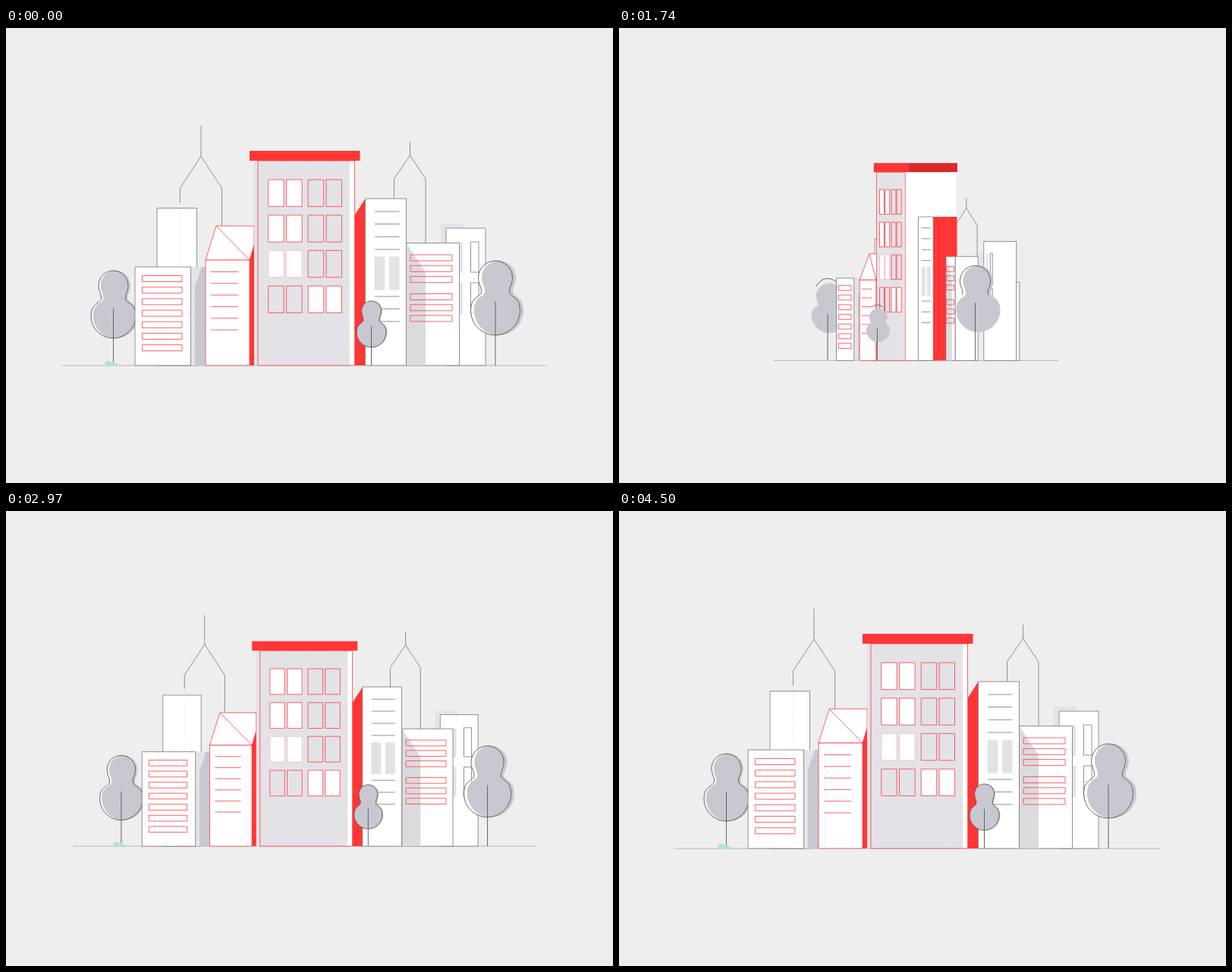
An HTML page for the animation above (4530 ms loop, 800 px wide and 600 px high).

```html
<!DOCTYPE html>
<html lang="en">
<head>
<meta charset="utf-8">
<title>City</title>
<style>
html,body{margin:0;width:100%;height:100%;overflow:hidden;background:#eee}
svg{display:block;width:100vw;height:100vh}
svg *{vector-effect:non-scaling-stroke}
.n{fill:none}.w{fill:#fff}.pale{fill:#e3e3e8}.dark{fill:url(#diag)}.bars{fill:url(#bars)}
.red{fill:#ff3636}.deep{fill:#d92b2d}.shade{fill:#dbdbde}.green{fill:#a9e8cc}
.g{stroke:#77777b;stroke-width:.8}.r{stroke:#ff3c42;stroke-width:.8}.p{stroke:#f3b9c4;stroke-width:.8}
.d{stroke:#ddd;stroke-width:.7;stroke-dasharray:2 2}
.t{stroke:#55555c;stroke-width:.9}
</style>
</head>
<body>
<svg id="stage" viewBox="0 0 800 600">
<defs>
<pattern id="bars" width="3" height="6" patternUnits="userSpaceOnUse"><path fill="#e5e5e8" d="M0 0h3v6h-3z"/><path fill="#dfdfe6" d="M0 0h1.3v6h-1.3z"/></pattern>
<pattern id="diag" width="3" height="3" patternUnits="userSpaceOnUse" patternTransform="rotate(45)"><path fill="#cccbd3" d="M0 0h3v3h-3z"/><path fill="#c4c3ce" d="M0 0h1.4v3h-1.4z"/></pattern>
</defs>
</svg>
<script>
const LOOP = 4530, CX = 393, BASE = 445, TURN_B = .674, S_END = .936;
const stage = document.getElementById('stage');
const clamp = v => Math.max(0, Math.min(1, v));
const mix = (a, b, p) => a + (b - a) * p;
const grow = (t, start, dur = 850) => 1 - Math.pow(1 - clamp((t - start) / dur), 2.4);
const rect = (x, y, w, h, c) => `<rect x="${x}" y="${y}" width="${w}" height="${h}" class="${c}"/>`;
const path = (d, c) => `<path d="${d}" class="${c}"/>`;
const each = (list, f) => list.map(f).join('');
const bar = (x, w, c) => y => path(`M${x} ${y}h${w}`, 'n ' + c);

function add(tag, cls, html = '') {
  const el = document.createElementNS('http://www.w3.org/2000/svg', tag);
  if (cls) el.setAttribute('class', cls);
  el.innerHTML = html;
  return stage.appendChild(el);
}

// Camera scale: [time, scale, slope per ms], joined by Hermite curves
const zoom = [[1620, .544, .0001], [2040, .794, .0006], [2160, .8625, .0005], [2520, S_END, .00004], [4500, 1, .000028]];
function scaleAt(t) {
  if (t < 1620) return .545 * (1 - Math.pow(1 - clamp((t - 440) / 1250), 2.5));
  if (t >= 4500) return 1;
  const i = zoom.findIndex(z => t < z[0]);
  const [t0, a, m] = zoom[i - 1], [t1, b, n] = zoom[i];
  const d = t1 - t0, p = (t - t0) / d, q = 1 - p;
  return q * q * (a * (1 + 2 * p) + m * d * p) + p * p * (b * (3 - 2 * p) - n * d * q);
}

function cameraAt(t) {
  const s = scaleAt(t), u = clamp((s - .5) / (S_END - .5)), S = Math.max(s, S_END);
  const turned = clamp((u - TURN_B) / (1 - TURN_B));
  const pose = (a, b, c) => u < TURN_B ? mix(a, b, u / TURN_B) : mix(b, c, turned);
  const depth = k => 1 - (1 - S) * k;
  return {
    t, s, u, turned, pose, depth,
    gy: pose(438, 440, BASE - 62.5 * (1 - S)),
    x: (a, b, c, k) => pose(391 + (a - 391) * Math.min(1, s / .5), b, CX + (c - CX) * depth(k))
  };
}

// A wall: drawn as seen from the front; a = side view, b = half turned, c = front view
const parts = [];
function panel(o, html) {
  const el = add('g', '', html), [x0, x1] = o.x, c = o.c || o.x;
  parts.push(cam => {
    const l = cam.x(o.a[0], o.b[0], c[0], o.k), r = cam.x(o.a[1], o.b[1], c[1], o.k);
    const h = grow(cam.t, o.at) * cam.pose(o.h[0], o.h[1], cam.depth(o.k));
    const seen = r - l > .2 && h > .002;
    el.style.display = seen ? '' : 'none';
    if (!seen) return;
    const sx = (r - l) / (x1 - x0);
    el.setAttribute('transform', `matrix(${sx} 0 0 ${h} ${l - x0 * sx} ${cam.gy - BASE * h})`);
  });
  return el;
}

function treePath(x, top, bot, w1, w2, neck) {
  const y1 = top + w1, y2 = bot - w2, d = y2 - y1, n = w1 * neck;
  const ny = y1 + d * .42;
  const at = (sx, y) => `${x + sx} ${y}`;
  return `M${at(0, bot)}C${at(-.55 * w2, bot)} ${at(-w2, bot - .45 * w2)} ${at(-w2, y2)}` +
    `C${at(-w2, y2 - .45 * d)} ${at(-n, y1 + .6 * d)} ${at(-n, ny)}` +
    `C${at(-n, y1 + .25 * d)} ${at(-w1, y1 + .2 * d)} ${at(-w1, y1)}` +
    `C${at(-w1, top + .45 * w1)} ${at(-.55 * w1, top)} ${at(0, top)}` +
    `C${at(.55 * w1, top)} ${at(w1, top + .45 * w1)} ${at(w1, y1)}` +
    `C${at(w1, y1 + .2 * d)} ${at(n, y1 + .25 * d)} ${at(n, ny)}` +
    `C${at(n, y1 + .6 * d)} ${at(w2, y2 - .45 * d)} ${at(w2, y2)}` +
    `C${at(w2, bot - .45 * w2)} ${at(.55 * w2, bot)} ${at(0, bot)}`;
}

function tree(o) {
  const back = add('path', 'w'), fill = add('path', 'dark'), line = add('path', 'n t'), trunk = add('path', 'n t');
  line.setAttribute('pathLength', 1);
  parts.push(cam => {
    const x = cam.x(...o.x, o.k), e = cam.depth(o.k), g = grow(cam.t, o.at);
    const size = g * cam.pose(.88, .93, e), lift = cam.pose(.91, .94, e);
    const cy = cam.gy - o.mid * lift, w2 = o.w2 * size, bot = cy + w2;
    const shape = up => treePath(0, mix(cy - w2, bot - o.tall * size, up), bot, mix(w2, o.w1 * size, up), w2, mix(1, .82, up));
    const shown = size > .1, drawn = clamp((cam.t - o.draw) / o.drawFor), gap = (1 - drawn) / 2;
    for (const el of [back, fill, line]) {
      el.style.display = shown ? '' : 'none';
      el.setAttribute('transform', `translate(${x + (el === fill ? o.shift * size : 0)} 0)`);
    }
    fill.setAttribute('d', shape(grow(cam.t, o.at + 330, 450)));
    back.setAttribute('d', shape(1));
    line.setAttribute('d', shape(1));
    back.style.opacity = drawn < 1 ? 0 : .6;
    line.style.opacity = drawn ? 1 : 0;
    line.style.strokeDasharray = drawn < 1 ? `0 ${gap} ${drawn} ${gap}` : 'none';
    trunk.style.display = g ? '' : 'none';
    trunk.setAttribute('d', `M${x} ${cam.gy}v${-o.trunk * g * cam.pose(.9, .93, e)}`);
  });
}

const ground = add('path', 'n g');
ground.style.stroke = '#aaa';
parts.push(cam => {
  const mid = mix(391, CX, cam.u), half = 320 * cam.s;
  ground.setAttribute('d', `M${mid - half} ${cam.gy}h${half * 2}`);
});

// Left block at the back and the two masts
panel({x: [199, 251.5], a: [370, 400], b: [257, 302.5], h: [.8, .872], k: .85, at: 1150},
  rect(199, 237.5, 52.5, 207.5, 'w g'));
panel({x: [229.5, 284.5], a: [385, 415], b: [302, 352], h: [.8, .88], k: .75, at: 1250},
  path('M257 129V169L229.5 211V230M257 169L284.5 211V262', 'n g') + path('M229.5 230V315', 'n d'));
panel({x: [511.5, 553], a: [425, 450], b: [487.5, 526], h: [.8, .907], k: .9, at: 1250},
  path('M532.5 150V168L511.5 199V300M532.5 168L553 199V300', 'n g'));

// Right block at the back
panel({x: [573, 603], a: [457, 463], b: [517, 546], h: [.7, .91], k: .88, at: 900}, rect(573, 258, 30, 25, 'pale'));
panel({x: [0, 10], c: [632, 620], a: [504, 510], b: [571, 571], h: [.7, .91], k: .88, at: 900},
  rect(0, 309, 10, 136, 'w g'));
panel({x: [580, 632], a: [463, 504], b: [524, 571.5], h: [.85, .912], k: .88, at: 860},
  rect(580, 264, 52, 181, 'w g'));
panel({x: [580, 632], a: [463, 463], b: [524, 571.5], h: [.85, .912], k: .88, at: 860},
  rect(591, 283, 11, 40, 'pale') + rect(591, 336, 11, 41, 'pale') +
  rect(612.5, 282, 10.5, 40, 'n g') + rect(612.5, 336, 10.5, 40, 'n g'));

tree({x: [303, 207, 141.5], tall: 89, w1: 19.5, w2: 29.5, mid: 65.5, trunk: 75, k: .88, at: 1215, draw: 1600, drawFor: 720, shift: 3});
panel({x: [131, 150], a: [299, 304], b: [197, 209], h: [.8, .9], k: .88, at: 1650},
  path('M131 445C129 438 136 438 139 441C142 439 145 443 150 445Z', 'green'));

// Left block
panel({x: [243.5, 263], a: [326, 343], b: [270, 295], h: [.82, .877], k: .88, at: 898},
  rect(243.5, 315, 19.5, 130, 'pale') + path('M249 445V341L258 315H263V445Z', 'dark'));
panel({x: [170, 243.5], a: [312, 326], b: [224.5, 270], h: [.82, .877], k: .88, at: 898},
  rect(170, 315, 73.5, 130, 'w g') + each([0, 1, 2, 3, 4, 5, 6], i => rect(179.5, 326.5 + 15.2 * i, 52.5, 8, 'n r')));

// House
const house = {x: [263, 321], a: [326, 340], b: [295.5, 336], h: [.82, .885], k: .9, at: 1200};
panel({...house, x: [321, 327], a: [340, 340], b: [336, 337]}, path('M321 445V306L327 286V445Z', 'red'));
const roof = panel(house, path('', 'w r')).firstChild;
parts.push(cam => {
  const ax = mix(297, 277, cam.turned);
  roof.setAttribute('d', `M321 306H263L${ax} 261H327V286L321 306L${ax} 261`);
});
panel(house, rect(263, 306, 58, 139, 'w r') + each([0, 1, 2, 3, 4, 5], i => bar(270, 36, 'r')(321.5 + 15.3 * i)));

// Tower
const tower = {h: [.917, .929], k: .95, at: 760};
panel({...tower, x: [0, 10], c: [459.5, 447], a: [358, 442], b: [422.5, 451]},
  rect(0, 170, 10, 275, 'w') + path('M0 445H6', 'n r'));
panel({...tower, x: [332, 459.5], a: [340, 358.5], b: [338, 422.5]}, rect(332, 175, 127.5, 270, 'w'));
panel({...tower, x: [327, 453], a: [341, 358], b: [338, 419]}, rect(327, 175, 126, 270, 'bars'));
const rowY = [200, 246.8, 293.4, 340.2], colX = [345.7, 369.6, 398.2, 422];
panel({...tower, x: [332, 459.5], a: [340, 358.5], b: [338, 422.5]},
  rect(332, 175, 127.5, 270, 'n r') + each(rowY, (y, i) => each(colX, (x, j) =>
    rect(x, y, 20.5, 35.4, ((j < 2) === (i < 3) ? 'w ' : 'n ') + (i === 2 && j < 2 ? 'p' : 'r')))));
panel({...tower, x: [0, 10], c: [466.5, 453], a: [362, 442], b: [428, 455.5]}, rect(0, 162, 10, 13, 'deep'));
panel({...tower, x: [321, 466.5], a: [338, 362.5], b: [330.5, 428.5]}, rect(321, 162, 145.5, 13, 'red'));

// Slim block with red sides
const slim = {h: [.85, .891], k: .96, at: 824};
panel({...slim, x: [460, 473.5], a: [393, 380], b: [442, 429.5]}, path('M473.5 225V445H460V246Z', 'red'));
panel({...slim, x: [0, 10], c: [527.5, 511], a: [393, 431], b: [465, 480.5]}, rect(0, 225, 10, 220, 'red'));
panel({...slim, x: [473.5, 527.5], a: [380, 393], b: [429.5, 465.5]},
  rect(473.5, 225, 54, 220, 'w g') + rect(485.5, 301.5, 13.5, 44, 'bars') + rect(505, 301.5, 13.5, 44, 'bars') +
  each([242, 258.5, 275.3, 292, 354, 370.5, 387], bar(486, 32.5, 'g')));

// Wide block on the right
const wide = {h: [.833, .892], k: .88, at: 783};
panel({...wide, x: [0, 10], c: [597.5, 583], a: [414.5, 451], b: [512.5, 527.5]}, rect(0, 283.5, 10, 161.5, 'w g'));
panel({...wide, x: [528, 597.5], a: [410.5, 414.5], b: [481, 512.5]}, rect(528, 283.5, 69.5, 161.5, 'w g'));
panel({...wide, x: [528, 553], a: [411, 411], b: [484, 506.5]}, path('M528 284L553 322V445H528Z', 'shade'));
panel({...wide, x: [528, 597.5], a: [410.5, 414.5], b: [481, 512.5]},
  each([299, 313.3, 327.6, 350.5, 364.8, 379], y => rect(533, y, 55, 8, 'n r')));

tree({x: [310, 414.5, 481.5], tall: 61, w1: 13, w2: 19.5, mid: 43.5, trunk: 52, k: 1, at: 1215, draw: 1650, drawFor: 750, shift: 1.5});
tree({x: [435, 553.5, 645], tall: 98, w1: 22.5, w2: 32.5, mid: 72.5, trunk: 84, k: .88, at: 895, draw: 1500, drawFor: 570, shift: 4.5});

function draw(time) {
  const t = time < 30 ? 4500 : time;
  stage.style.visibility = t < 440 ? 'hidden' : 'visible';
  const cam = cameraAt(t);
  for (const update of parts) update(cam);
}

function frame() {
  draw(performance.now() % LOOP);
  requestAnimationFrame(frame);
}
frame();
</script>
</body>
</html>
```
